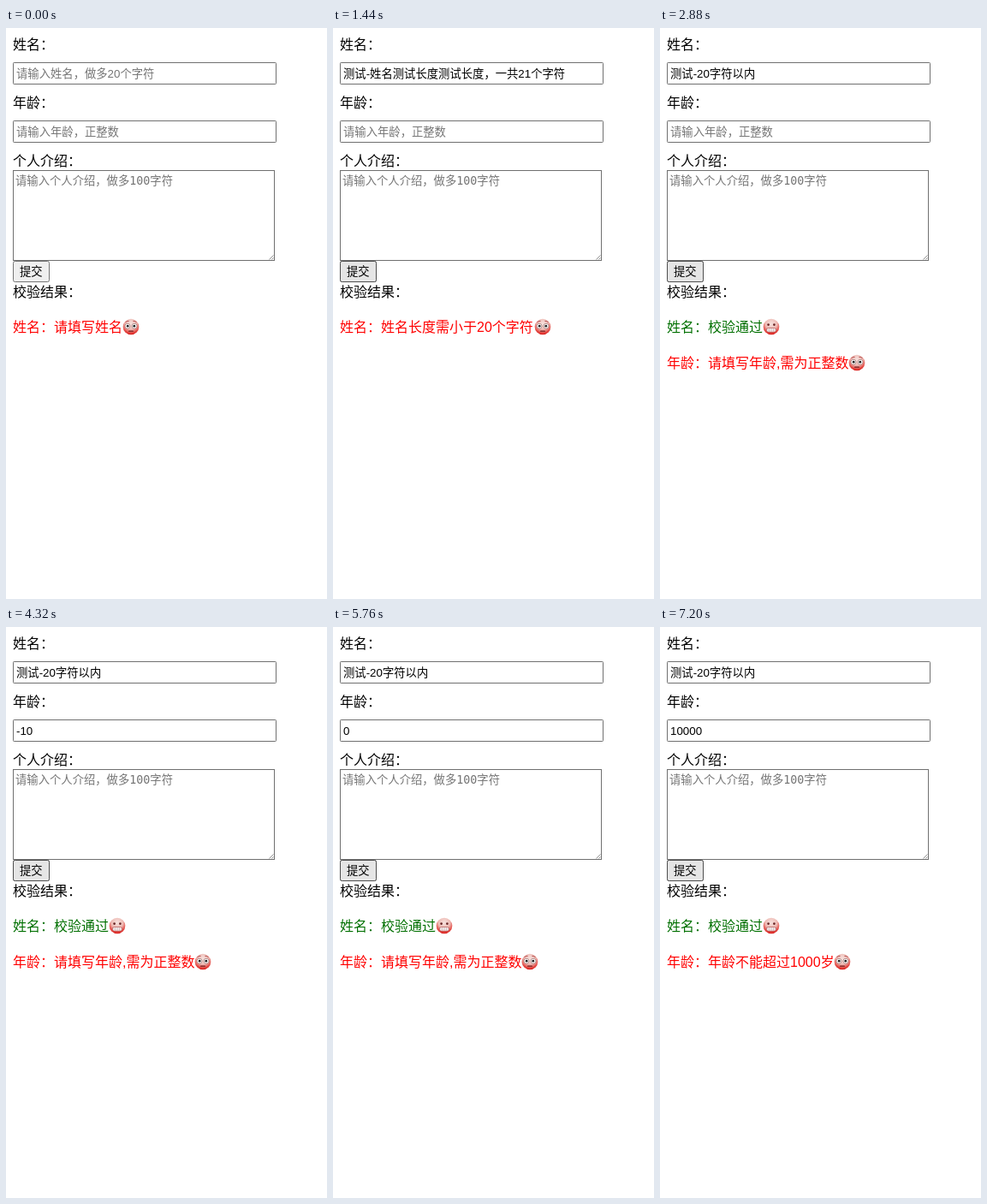
An HTML page for the animation above (8000 ms loop, 375 px wide and 667 px high).

```html
<!DOCTYPE html>
<html lang="zh-CN">
<head>
<meta charset="utf-8">
<title>表单校验</title>
<style>
  html, body { margin: 0; width: 100%; height: 100%; overflow: hidden; background: #fff; }
  svg { display: block; }
  text { font: 16px "Liberation Sans", "Noto Sans CJK SC", sans-serif; white-space: pre; }
  .field { font-size: 13.333px; }
  .hint { fill: #757575; }
  .mono { font-family: "DejaVu Sans Mono", "Noto Sans CJK SC", monospace; }
  .bad { fill: #f00; }
  .good { fill: #007000; }
  .box { fill: #fff; stroke: #707070; }

  [class^="on-"] { visibility: hidden; animation: 8s step-end infinite; }
  .on-empty { animation-name: empty; }
  .on-typed { animation-name: typed; }
  .on-long { animation-name: long; }
  .on-valid { animation-name: valid; }
  .on-ageless { animation-name: ageless; }
  .on-wrong { animation-name: wrong; }
  .on-minus { animation-name: minus; }
  .on-zero { animation-name: zero; }
  .on-huge { animation-name: huge; }
  @keyframes empty { 0% { visibility: visible } 18%, 100% { visibility: hidden } }
  @keyframes typed { 0% { visibility: hidden } 18%, 100% { visibility: visible } }
  @keyframes long { 0%, 36%, 100% { visibility: hidden } 18% { visibility: visible } }
  @keyframes valid { 0% { visibility: hidden } 36%, 100% { visibility: visible } }
  @keyframes ageless { 0% { visibility: visible } 54%, 100% { visibility: hidden } }
  @keyframes wrong { 0%, 90%, 100% { visibility: hidden } 36% { visibility: visible } }
  @keyframes minus { 0%, 72%, 100% { visibility: hidden } 54% { visibility: visible } }
  @keyframes zero { 0%, 90%, 100% { visibility: hidden } 72% { visibility: visible } }
  @keyframes huge { 0% { visibility: hidden } 90%, 100% { visibility: visible } }
</style>
</head>
<body>
<svg width="375" height="667" viewBox="0 0 375 667">
  <defs>
    <radialGradient id="skin" cx=".5" cy=".3" r=".72">
      <stop offset="0" stop-color="#f6e2de"/>
      <stop offset=".5" stop-color="#eebbb5"/>
      <stop offset=".8" stop-color="#e34a44"/>
      <stop offset="1" stop-color="#d80f0f"/>
    </radialGradient>
    <circle id="head" r="9.3" fill="url(#skin)"/>
    <g id="shocked">
      <use href="#head"/>
      <path d="M-6.5-5.2q2-1.9 4-1.5M6.5-5.2q-2-1.9-4-1.5" fill="none" stroke="#a33" stroke-width=".9"/>
      <g fill="#fff" stroke="#8c5a56" stroke-width=".6">
        <circle cx="-4" cy="-.8" r="3"/><circle cx="4" cy="-.8" r="3"/>
      </g>
      <circle cx="-3.8" cy="-.8" r="1.4" fill="#222"/><circle cx="3.8" cy="-.8" r="1.4" fill="#222"/>
      <path d="M-2.3 5.2h4.6" stroke="#702020" stroke-width="1.3" stroke-linecap="round"/>
    </g>
    <g id="grin">
      <use href="#head"/>
      <circle cx="-3.4" cy="-2.4" r="1.3" fill="#622"/><circle cx="3.4" cy="-2.4" r="1.3" fill="#622"/>
      <rect x="-5.6" y="1.5" width="11.2" height="4.6" rx="2.2" fill="#fff" stroke="#a44" stroke-width=".7"/>
      <path d="M-5.4 3.8H5.4M-2.6 1.6v4.4M0 1.6v4.4M2.6 1.6v4.4" stroke="#b99" stroke-width=".5"/>
    </g>
  </defs>

  <text x="8" y="25">姓名：</text>
  <text x="8" y="93">年龄：</text>
  <text x="8" y="161">个人介绍：</text>
  <text x="8" y="314">校验结果：</text>

  <rect class="box" x="8.5" y="40.5" width="307" height="25" rx=".8"/>
  <rect class="box" x="8.5" y="108.5" width="307" height="25" rx=".8"/>
  <rect class="box" x="8.5" y="166.5" width="305" height="105"/>
  <path d="M307.5 270.5l5-5M310.5 270.5l2-2" stroke="#777" stroke-width=".8"/>
  <text class="field hint mono" x="11" y="183">请输入个人介绍，做多100字符</text>

  <rect x="8.5" y="272.5" width="42" height="24" rx="2" fill="#efefef" stroke="#767676"/>
  <g class="on-typed">
    <rect x="8.5" y="272.5" width="42" height="24" rx="2" fill="#e5e5e5" stroke="#4f4f4f"/>
  </g>
  <text class="field" x="16" y="289">提交</text>

  <g class="on-empty">
    <text class="field hint" x="12" y="58">请输入姓名，做多20个字符</text>
    <text class="bad" x="8" y="355">姓名：请填写姓名</text>
    <use href="#shocked" x="146" y="349"/>
  </g>
  <g class="on-long">
    <text class="field" x="12" y="58">测试-姓名测试长度测试长度，一共21个字符</text>
    <text class="bad" x="8" y="355">姓名：姓名长度需小于20个字符</text>
    <use href="#shocked" x="245" y="349"/>
  </g>
  <g class="on-valid">
    <text class="field" x="12" y="58">测试-20字符以内</text>
    <text class="good" x="8" y="355">姓名：校验通过</text>
    <use href="#grin" x="130" y="349"/>
  </g>

  <g class="on-ageless"><text class="field hint" x="12" y="126">请输入年龄，正整数</text></g>
  <g class="on-minus"><text class="field" x="12" y="126">-10</text></g>
  <g class="on-zero"><text class="field" x="12" y="126">0</text></g>
  <g class="on-wrong">
    <text class="bad" x="8" y="397">年龄：请填写年龄,需为正整数</text>
    <use href="#shocked" x="230" y="391"/>
  </g>
  <g class="on-huge">
    <text class="field" x="12" y="126">10000</text>
    <text class="bad" x="8" y="397">年龄：年龄不能超过1000岁</text>
    <use href="#shocked" x="213" y="391"/>
  </g>
</svg>
</body>
</html>
```
